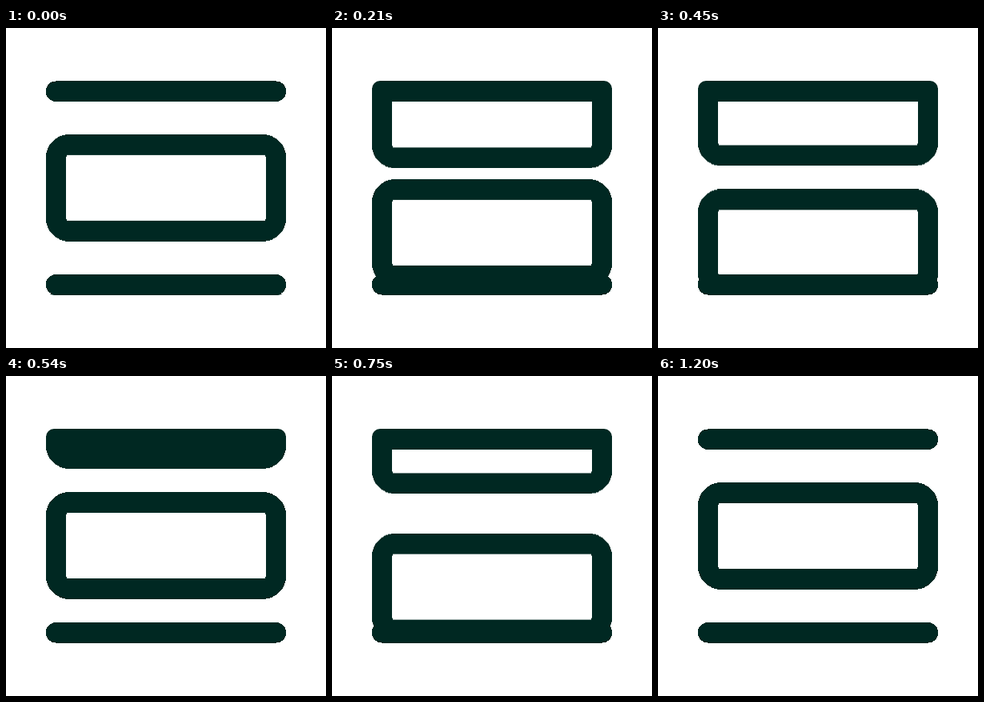
These frames come from a looping animation (400x400 px, 1230 ms). An HTML page:

```html
<!DOCTYPE html>
<html lang="en">
<head>
<meta charset="utf-8">
<title>Vertical carousel</title>
<style>
  html, body { margin: 0; width: 100%; height: 100%; overflow: hidden; background: #fff; }
  svg { display: block; width: 100vw; height: 100vh; }
  .icon { fill: none; stroke: #002822; stroke-width: 25.5; stroke-linecap: round; shape-rendering: crispEdges; }

  .box { animation: 1230ms linear infinite; }
  .leave { animation-name: leave; }
  .pass { animation-name: pass; }
  .late { animation-delay: -970ms; }
  .arrive { animation-name: arrive; }

  @keyframes leave {
    0% { transform: translateY(0); animation-timing-function: cubic-bezier(.333, .09, .667, .405); }
    26.83%, 100% { transform: translateY(-198px); }
  }
  @keyframes pass {
    0% { transform: translateY(188px); }
    50.24%, 100% { transform: translateY(-199.1px); }
  }
  @keyframes arrive {
    0%, 46.98% { transform: translateY(240px); }
    46.99% { transform: translateY(187px); animation-timing-function: cubic-bezier(.333, .736, .667, 1); }
    82.93%, 100% { transform: translateY(0); }
  }
</style>
</head>
<body>
<svg viewBox="0 0 400 400">
  <defs>
    <clipPath id="window"><rect x="50" y="66" width="300" height="268" rx="10"/></clipPath>
    <rect id="card" x="62.5" y="145.8" width="275" height="108.4" rx="16.7"/>
  </defs>
  <g class="icon">
    <g clip-path="url(#window)">
      <use href="#card" class="box leave"/>
      <use href="#card" class="box pass"/>
      <use href="#card" class="box pass late"/>
      <use href="#card" class="box arrive"/>
    </g>
    <path d="M62.5 79.2H337.5M62.5 320.8H337.5"/>
  </g>
</svg>
</body>
</html>
```
